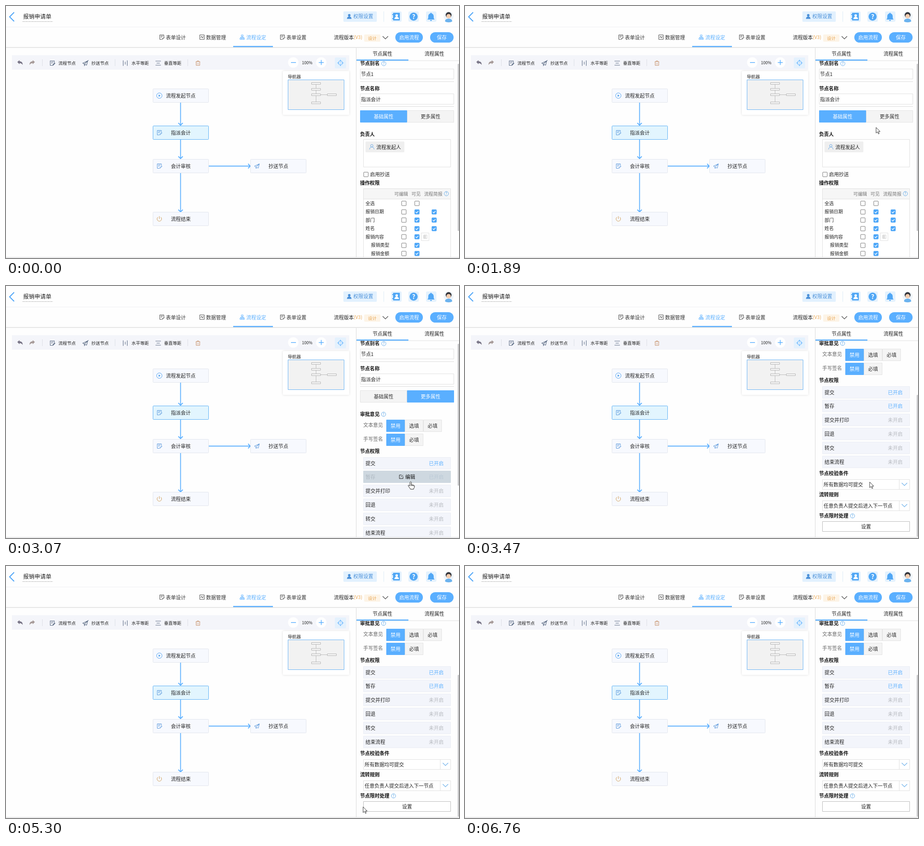
These frames come from a looping animation (1003x558 px, 7.79 s). An HTML page with a canvas:

```html
<!DOCTYPE html>
<html lang="zh-CN">
<head>
<meta charset="utf-8">
<title>流程设定</title>
<style>
  html, body { margin: 0; width: 100%; height: 100%; overflow: hidden; background: #fefefe; }
  canvas { display: block; }
</style>
</head>
<body>
<canvas id="stage" width="1003" height="558"></canvas>
<script>
const ctx = document.getElementById('stage').getContext('2d');
const LOOP = 7790, TAB_SWITCH = 2360, SCROLL = 157;
const BLUE = '#5aafff', INK = '#222', GREY = '#e0e0e0', SLATE = '#5b6b84', ORANGE = '#e9a54f';

// Cursor keys: time, x, y
const KEYS = [
  [140, 560, 560], [860, 421, 280], [1180, 421, 280], [1340, 431, 279], [1580, 431, 279],
  [1890, 910, 269], [2050, 938, 246], [2600, 938, 246], [3070, 896, 434], [4020, 896, 434],
  [4660, 779, 539], [4900, 779, 539], [5620, 800, 529], [5970, 811, 518], [6440, 811, 518],
  [6750, 820, 560]
];

const ICONS = {
  form: 'M4.5-1V-5h-9V5H0M-2.5-2.5h5M-2.5 0h3M1 5l.5-2L5-.5 6 .5 2.5 4z',
  chart: 'M-5-5H5V5H-5zM-3 1l2-3 2 4 2-4',
  tree: 'M-2-5h4v3h-4zM-5 2h3v3h-3zM-1.5 2h3v3h-3zM2 2h3v3h-3zM0-2v4M-3.5 2V0h7v2',
  plane: 'M5.5-5L-5.5 0l3.5 2zL-2 2v3.5L0 3l3 1.5z',
  power: 'M-3-4a5 5 0 1 0 6 0M0-6V0',
  trash: 'M-5-3H5M-2-3v-2h4v2M-4-3V5h8v-8M-1.5 0v3M1.5 0v3',
  person: 'M-2.8-2.5a2.8 2.8 0 1 0 5.6 0a2.8 2.8 0 1 0-5.6 0M-5 5.5c0-7 10-7 10 0',
  columns: 'M-4.5-6V6M4.5-6V6M0-3V3',
  rows: 'M-6-4.5H6M-3.5 0h7M-6 4.5H6',
  target: 'M-4.5 0a4.5 4.5 0 1 0 9 0a4.5 4.5 0 1 0-9 0M0-7v4M0 3v4M-7 0h4M3 0h4M-1 0h2',
  edit: 'M1-4h-5v8h8V-1M-1 1l5-5',
  down: 'M-6-3L0 3l6-6'
};

function text(s, x, cy, size = 10.9, color = INK, align = 'left', weight = 400) {
  ctx.font = `${weight} ${size}px "Noto Sans CJK SC", "Noto Sans CJK", sans-serif`;
  ctx.textAlign = align;
  ctx.fillStyle = color;
  ctx.fillText(s, x, cy + size * 0.37);
}
const center = (s, x, cy, color, size) => text(s, x, cy, size, color, 'center');
const heading = (s, cy) => text(s, 784, cy, 10.8, '#111', 'left', 700);

function box(x, y, w, h, fill, stroke, r = 0) {
  ctx.beginPath();
  if (stroke) ctx.roundRect(x + .5, y + .5, w - 1, h - 1, r);
  else ctx.roundRect(x, y, w, h, r);
  if (fill) { ctx.fillStyle = fill; ctx.fill(); }
  if (stroke) { ctx.strokeStyle = stroke; ctx.lineWidth = 1; ctx.stroke(); }
}
const bar = (x, y, w, h, color) => box(x, y, w, h, color);

function shape(d, x, y, stroke, width = 1, fill) {
  ctx.save();
  ctx.translate(x, y);
  const p = new Path2D(d);
  if (fill) { ctx.fillStyle = fill; ctx.fill(p); }
  if (stroke) { ctx.strokeStyle = stroke; ctx.lineWidth = width; ctx.stroke(p); }
  ctx.restore();
}
const icon = (name, x, y, color, width) => shape(ICONS[name], x, y, color, width);

function disc(x, y, r, fill, stroke) {
  ctx.beginPath();
  ctx.arc(x, y, r, 0, 7);
  if (fill) { ctx.fillStyle = fill; ctx.fill(); }
  if (stroke) { ctx.strokeStyle = stroke; ctx.lineWidth = 1; ctx.stroke(); }
}
function help(x, y) {
  disc(x, y, 4.8, null, '#6aaeea');
  center('?', x, y, '#4f9fe6', 8);
}

function header() {
  shape('M10-10L0 0l10 10', 8, 24, '#4ba3f7', 2);
  text('报销申请单', 38, 23, 12.5);
  ctx.setLineDash([2, 1.5]);
  shape('M37 34.5H104', 0, 0, '#999');
  ctx.setLineDash([]);

  box(747, 12, 74, 23, '#e2f1fe', null, 2);
  shape(ICONS.person, 760, 23, null, 0, '#4a90d9');
  text('权限设置', 769, 23, 11, '#4a90d9');
  bar(836, 12, 1, 23, '#dcebf7');
  for (const x of [853, 891, 930]) box(x, 12, 23, 23, '#e4f2fe', null, 3);
  box(857, 15, 15, 17, '#51a7f5', null, 1);
  shape(ICONS.person, 865, 23.5, null, 0, '#fff');
  bar(855, 18, 3, 2, '#51a7f5');
  bar(855, 27, 3, 2, '#51a7f5');
  disc(902.5, 23.5, 9, '#51a7f5');
  text('?', 902.5, 23.5, 14, '#fff', 'center', 700);
  shape('M-8 6c2-2 2-4 2-7c0-9 12-9 12 0c0 3 0 5 2 7zM-2 7h4c0 3-4 3-4 0zM-1-9h2v3h-2z', 941, 24, null, 0, '#51a7f5');
  disc(980, 23, 11, '#eef4fa');
  disc(980, 20, 6.5, '#33343a');
  disc(980, 22.5, 4.8, '#f4cdb0');
  shape('M-8 10c0-8 16-8 16 0c-4 3-12 3-16 0z', 980, 24, null, 0, '#6bb2ee');

  bar(0, 46, 1003, 1, '#f0f1f3');
  const tabs = [['form', 345, '表单设计'], ['chart', 434, '数据管理'], ['tree', 523, '流程设定'], ['form', 612, '表单设置']];
  tabs.forEach(([name, x, label], i) => {
    const color = i == 2 ? BLUE : '#333';
    icon(name, x, 69, color, .9);
    text(label, x + 9, 69.5, 11, color);
  });
  bar(503, 88.5, 88, 2.5, BLUE);
  text('流程版本', 726, 69.5, 11);
  text('(V3)', 770, 69.5, 10.5, ORANGE);
  box(793, 63, 36, 16, '#fdf4e7', null, 2);
  center('设计', 811, 71, ORANGE, 9.5);
  icon('down', 840, 70, '#444', 1.2);
  box(862, 58, 61, 23, BLUE, null, 11.5);
  center('启用流程', 892.5, 70, '#fff');
  box(939, 58, 52, 23, BLUE, null, 11.5);
  center('保存', 965, 70, '#fff');
  bar(0, 91, 1003, 1, '#dedede');
  bar(0, 92, 1003, 1, '#ededee');
}

function toolbar() {
  box(13, 109, 747, 32, '#f4f5fa');
  const undo = 'M-6-2l5-4v2.5c4 0 7 2 7 8c-2-3-4-4-7-4V3z';
  shape(undo, 31, 126, null, 0, '#787486');
  ctx.save();
  ctx.translate(58, 126);
  ctx.scale(-1, 1);
  shape(undo, 0, 0, null, 0, '#a69a98');
  ctx.restore();
  for (const x of [80, 241, 402]) bar(x, 118, 1, 15, '#dcdfe6');
  const tools = [['form', 102.5, 116, '流程节点'], ['plane', 175.5, 189, '抄送节点'],
    ['columns', 264, 278, '水平等距'], ['rows', 337, 350, '垂直等距']];
  for (const [name, x, tx, label] of tools) {
    icon(name, x, 126.5, SLATE, 1.1);
    text(label, tx, 126.5, 9.6);
  }
  icon('trash', 425, 126.5, '#c9946e');
  disc(636, 125, 11.5, '#fff');
  disc(698, 125, 11.5, '#fff');
  bar(631, 124.5, 11, 1.5, BLUE);
  bar(692.5, 124.5, 11, 1.5, BLUE);
  bar(697.2, 119.5, 1.5, 11, BLUE);
  center('100%', 667, 125.5, INK, 9);
  box(728, 114, 25, 24, '#e4f1fd', null, 2);
  icon('target', 740.5, 126, BLUE, 1.2);
}

function navigator_() {
  ctx.save();
  ctx.shadowColor = '#0002';
  ctx.shadowBlur = 5;
  box(613, 144, 147, 97, '#fff', null, 2);
  ctx.restore();
  text('导航器', 624, 156, 9.6);
  box(624, 163, 125, 67, '#f2f2f2', '#69b3f5');
  shape('M686.5 173V212M696 196.5h15', 0, 0, '#bbb');
  for (const [x, y] of [[676, 169], [676, 182], [676, 194], [676, 212], [711, 194]])
    box(x, y, 21, 5, '#f6f6f6', '#b4b4b4');
}

function node(x, y, label, kind, active) {
  box(x, y, 124, 31, active ? '#e2f5fe' : '#f7f9fe', active ? '#5cb0f5' : '#e1e5ed', 1);
  const ix = x + 14.5, iy = y + 15.5;
  if (kind == 'play') {
    disc(ix, iy, 6, null, '#4b9ff0');
    shape('M-1.5-2.5L2.5 0l-4 2.5z', ix, iy, null, 0, '#4b9ff0');
  } else icon(kind, ix, iy, kind == 'power' ? '#d19c55' : '#5594da');
  center(label, x + 62, y + 15.5, INK, 10.9);
}

function flow(hovered) {
  for (const [from, to] of [[214, 264], [296, 338], [370, 456]])
    shape(`M386.5 ${from}V${to}m-5-5l5 5l5-5`, 0, 0, BLUE, 1.8);
  shape('M449 354.5H541m-5-5l5 5l-5 5', 0, 0, BLUE, 1.8);
  node(325, 183, '流程发起节点', 'play');
  node(325, 265, '指派会计', 'form', true);
  node(325, 339, '会计审核', 'form');
  node(541, 339, '抄送节点', 'plane');
  node(325, 456, '流程结束', 'power');
  if (hovered)
    for (const [x, y] of [[386.5, 265], [386.5, 295.5], [325, 280], [448.5, 280]]) disc(x, y, 2.8, '#fff', '#3d98ee');
}

function button(x, y, w, h, label, active) {
  box(x, y, w, h, active ? BLUE : '#f4f4f4', active ? BLUE : '#e3e3e3');
  center(label, x + w / 2, y + h / 2 + .5, active ? '#fff' : '#333');
}

function checkbox(x, y, on) {
  box(x - 5.5, y - 5.5, 11, 11, on ? '#4aa5f8' : '#fff', on ? '#4aa5f8' : '#777', 1);
  if (on) shape('M-3 0l2.2 2.3L3-2', x, y, '#fff', 1.3);
}

function basicTab() {
  heading('负责人', 284);
  box(791, 295, 194, 62, '#fff', GREY);
  box(796, 300, 86, 24, '#efefef', null, 2);
  icon('person', 810, 312, '#6ba9e6');
  text('流程发起人', 820, 312.5);
  checkbox(797, 373, false);
  text('启用抄送', 806, 373);
  heading('操作权限', 392);
  box(791, 404, 194, 170, '#fff', GREY);
  box(791, 404, 194, 24, '#f6f6f6', GREY);
  center('可编辑', 875, 416, '#777', 10.2);
  center('可见', 908, 416, '#777', 10.2);
  center('流程简报', 946, 416, '#777', 10.2);
  help(975, 415.5);
  ['全选', '报销日期', '部门', '姓名', '报销内容', '报销类型', '报销金额'].forEach((label, i) => {
    const y = 437 + i * 18.5;
    text(label, i > 4 ? 808 : 796, y, 10.2);
    checkbox(881, Math.round(y), false);
    checkbox(910, Math.round(y), i > 0);
    if (i > 0 && i < 4) checkbox(948, Math.round(y), true);
  });
  box(919, 502, 18, 18, '#fff', GREY);
  shape('M-3-4h7v8h-7zM-4-2h6M-4 0h6M-4 2h6M0-4v8', 928, 511, '#c4c4c4', .8);
}

function select(y, value) {
  box(791, y, 194, 23, '#fff', GREY);
  bar(961, y, 1, 23, GREY);
  text(value, 794, y + 11.5);
  icon('down', 973, y + 11, '#6aaeea', 1.1);
}

const ITEMS = ['提交', '暂存', '提交并打印', '回退', '转交', '结束流程'];
const itemTop = i => 378.5 + i * 30.8;

function moreTab(hoveredItem) {
  heading('审批意见', 284);
  help(836, 284);
  text('文本意见', 791, 307.5, 10.9, '#666');
  text('手写签名', 791, 339, 10.9, '#666');
  const choices = [['禁用', '选填', '必填'], ['禁用', '必填']];
  choices.forEach((row, r) => row.forEach((label, i) =>
    button(842 + i * 41, 296 + r * 31, 41, 27, label, i == 0)));
  heading('节点权限', 366.5);
  ITEMS.forEach((label, i) => {
    const y = Math.round(itemTop(i)), hot = i == hoveredItem, on = i < 2;
    box(791, y, 194, 27, hot ? '#ced8e0' : '#f3f5fb', hot ? '#ced8e0' : '#eaedf4');
    text(label, 796, y + 14, 10.9, hot ? '#aeb8c1' : INK);
    text(on ? '已开启' : '未开启', 969, y + 14, 10.9, hot ? '#b9c8d5' : on ? BLUE : '#b5b8be', 'right');
    if (hot) {
      icon('edit', 875, y + 13.5, '#222');
      text('编辑', 884, y + 14, 10.9, '#111', 'left', 500);
    }
  });
  heading('节点校验条件', 572);
  select(585, '所有数据均可提交');
  heading('流转规则', 619);
  select(632, '任意负责人提交后进入下一节点');
  heading('节点限时处理', 666);
  help(858, 666);
  box(791, 678, 194, 23, '#fff', '#bbb');
  center('设置', 888, 690);
}

function panel(more, scroll, hoveredItem) {
  box(775, 93, 228, 465, '#fefefe');
  bar(775, 93, 1, 464, '#d9d9d9');
  center('节点属性', 833.5, 106);
  center('流程属性', 948.5, 106);
  bar(776, 120.5, 227, 1, '#e2e2e2');
  bar(776, 118.5, 115, 2.5, BLUE);
  ctx.save();
  ctx.beginPath();
  ctx.rect(776, 121.5, 227, 435);
  ctx.clip();
  ctx.translate(0, -scroll);
  heading('节点别名', 127.5);
  help(836.5, 127.5);
  box(784, 139, 208, 23, '#fff', GREY);
  text('节点1', 786, 151);
  bar(784, 167, 208, 1, '#dcdcdc');
  heading('节点名称', 183);
  box(784, 194, 208, 24, '#fff', GREY);
  text('指派会计', 786, 207);
  bar(784, 222, 208, 1, '#dcdcdc');
  button(784, 231, 104, 27, '基础属性', !more);
  button(888, 231, 104, 27, '更多属性', more);
  if (more) moreTab(hoveredItem); else basicTab();
  ctx.restore();
  box(1000, 128 + scroll * .72, 4, more ? 314 : 370, '#c9c9cb', null, 1.5);
}

function cursorAt(t) {
  const i = KEYS.findIndex(k => k[0] > t);
  if (i < 1) return null;
  const [t0, x0, y0] = KEYS[i - 1], [t1, x1, y1] = KEYS[i];
  const k = (t - t0) / (t1 - t0);
  return { x: x0 + (x1 - x0) * k, y: y0 + (y1 - y0) * k };
}

function drawCursor({ x, y }, kind) {
  if (kind == 'move') {
    const arm = 'M-1-2v-3h-2l3-4 3 4H1v3z';
    for (let i = 0; i < 4; i++) {
      ctx.save();
      ctx.translate(x, y);
      ctx.rotate(i * Math.PI / 2);
      shape(arm, 0, 0, '#222', 1, '#fff');
      ctx.restore();
    }
    box(x - 1.5, y - 1.5, 3, 3, '#fff', '#222');
  } else if (kind == 'hand') {
    shape('M-1.5 1c0-2 3-2 3 0v5l5 1c2 .5 2 1.5 2 3c0 3-2 3-2 6h-7c-1-3-4-5-5-8c0-1.5 2-1.5 4 1zM4 7v2M6.3 7.5v2M1.5 6v3', x, y, '#222', 1, '#fff');
  } else {
    shape('M0 0V12.5l3-2.6 2.2 4.6 1.8-.9-2-4.4h4z', x, y, '#333', 1, '#fff');
  }
}

const inside = (p, x, y, w, h) => p && p.x >= x && p.x < x + w && p.y >= y && p.y < y + h;

function draw(t) {
  const more = t >= TAB_SWITCH;
  const scroll = t < 3390 ? 0 : t < 3470 ? SCROLL / 2 : SCROLL;
  const cursor = cursorAt(t);
  const onNode = inside(cursor, 325, 265, 124, 31);
  const item = more ? ITEMS.findIndex((_, i) => inside(cursor, 791, itemTop(i) - scroll, 194, 27)) : -1;
  const onTab = inside(cursor, 784, 231 - scroll, 208, 27);

  box(0, 0, 1003, 558, '#fefefe');
  header();
  toolbar();
  navigator_();
  flow(onNode);
  panel(more, scroll, item);
  bar(0, 556, 1003, 1, '#d4d4d6');
  if (cursor) drawCursor(cursor, onNode ? 'move' : onTab || item >= 0 ? 'hand' : 'arrow');
}

function tick() {
  draw(performance.now() % LOOP);
  requestAnimationFrame(tick);
}
tick();
</script>
</body>
</html>
```
